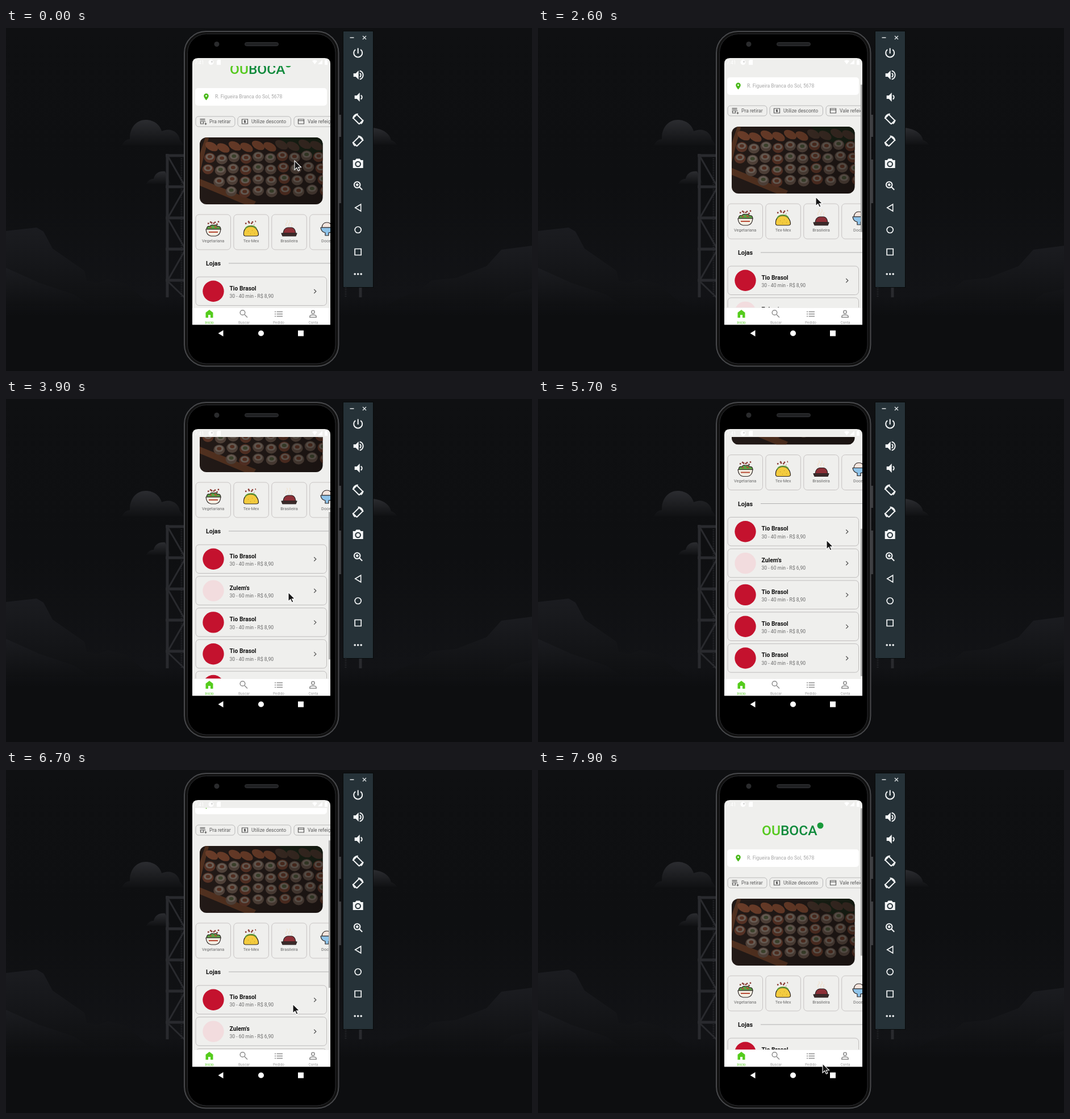
These frames come from a looping animation (926 px wide and 605 px high, 8000 ms). An HTML page:

```html
<!DOCTYPE html>
<html lang="pt">
<head>
<meta charset="utf-8">
<title>Food app scrolling</title>
<style>
  html, body { margin: 0; width: 100%; height: 100%; overflow: hidden; background: #0e0f11; }
  svg { display: block; width: 926px; height: 605px; }
  text { font: 8.6px Roboto, sans-serif; fill: #6a6a6a; }
  .bold { font-size: 10.3px; font-weight: 700; fill: #111; }
  .small { font-size: 7.4px; text-anchor: middle; }
  .tab { font-size: 6.4px; text-anchor: middle; fill: #a2a2a2; }
  .logo { font-size: 24.5px; font-weight: 500; fill: #0f8a3c; }
  .line { fill: none; stroke: currentColor; stroke-width: 2; }
  .card { fill: none; stroke: #c2bebe; stroke-width: .9; }
  .ink { stroke: #2b2424; stroke-width: 1.2; stroke-linejoin: round; }
</style>
</head>
<body>
<svg viewBox="0 0 926 605">
  <defs>
    <linearGradient id="sky" x2="0" y2="1">
      <stop stop-color="#0f1012"/><stop offset=".45" stop-color="#0e0f11"/>
      <stop offset=".78" stop-color="#121316"/><stop offset=".84" stop-color="#0d0e10"/>
    </linearGradient>
    <linearGradient id="haze" x2="0" y2="1">
      <stop stop-color="#2b2c30"/><stop offset="1" stop-color="#101113"/>
    </linearGradient>
    <linearGradient id="hill" x2="0" y2="1">
      <stop stop-color="#1b1c20"/><stop offset="1" stop-color="#0f1012"/>
    </linearGradient>
    <linearGradient id="shade">
      <stop stop-color="#000" stop-opacity=".05"/><stop offset="1" stop-color="#000" stop-opacity=".3"/>
    </linearGradient>
    <clipPath id="view"><path d="M328 67H571V493H328z"/></clipPath>
    <clipPath id="tabs"><path d="M328 493H571V523.5H328z"/></clipPath>
    <clipPath id="photo"><rect x="341" y="227" width="216.5" height="118" rx="12"/></clipPath>
  </defs>

  <!-- Backdrop -->
  <path fill="url(#sky)" d="M0 0H926V605H0z"/>
  <g fill="url(#haze)">
    <path d="M204 207q5-11 14-11c-1-20 12-34 28-34 15 0 25 9 28 20 15-7 30 1 32 15l8 10z"/>
    <path d="M247 275q4-9 13-9c2-10 10-14 20-13l10 22z"/>
    <path d="M640 176c20 0 35 8 38 22q6 1 10 8H640z"/>
  </g>
  <g fill="url(#hill)">
    <path d="M0 358L54 352 66 359 82 389 138 428 142 446 163 449 180 443 212 451 240 476 262 490H0z"/>
    <path d="M926 384L872 391 846 420 792 441 750 445 728 462 690 478 670 490H926z"/>
    <path d="M0 423L60 450 120 470 150 490H0zM926 460L890 468 860 490H926z"/>
  </g>
  <g fill="none" stroke="#292a2e" stroke-width="5">
    <path d="M284 222V475M281 225H316M281 280H316M281 335H316M281 390H316M281 445H316M624 455V475"/>
    <path stroke-width="3" d="M286 228L314 277M286 333L314 284M286 338L314 387M286 443L314 394M286 448L314 475"/>
    <path stroke-width="3" stroke-dasharray="1 2" d="M309 230V475M598 455V475"/>
  </g>

  <!-- Handset -->
  <path fill="#3b3c3f" d="M586 153h4v39h-4zM586 232h4v77h-4z"/>
  <rect x="314" y="6" width="271.5" height="590.5" rx="38" fill="#111" stroke="#48494c" stroke-width="2"/>
  <rect x="319.5" y="10.5" width="260.5" height="581.5" rx="33" fill="#000" stroke="#2c2d30"/>
  <circle cx="371" cy="28.500" r="4.500" fill="#2a2b2d"/>
  <rect x="420.500" y="25.500" width="59" height="6" rx="3" fill="#202123" stroke="#313235"/>
  <path fill="#efefed" d="M328 523V63q0-10 10-10H561q10 0 10 10V523z"/>

  <g clip-path="url(#view)">
    <g id="content">
      <text class="logo" x="394" y="115"><tspan fill="#55c91e">OU</tspan>BOCA</text>
      <circle cx="497" cy="98" r="5.500" fill="#199a3a"/>
      <rect x="333" y="140" width="232" height="31" rx="5" fill="#fff"/>
      <path fill="#4ab91b" fill-rule="evenodd" d="M352.500 149.500a4.300 4.300 0 0 1 4.300 4.300c0 3.200-4.300 7.700-4.300 7.700s-4.300-4.500-4.300-7.700a4.300 4.300 0 0 1 4.300-4.300zm0 2.700a1.500 1.500 0 1 0 .01 0z"/>
      <text x="368" y="158.300" style="fill:#a6a6a6">R. Figueira Branca do Sol, 5678</text>
      <g id="chips"></g>
      <g clip-path="url(#photo)">
        <path fill="#241b18" d="M341 227H558V345H341z"/>
        <path fill="#1b2417" d="M480 227H558V268L505 250z"/>
        <path fill="#553321" d="M341 256L351 227 357 228 347 266 341 290zM341 300L440 340 437 345H420L341 312z"/>
        <g id="rolls"></g>
        <path fill="url(#shade)" d="M341 227H558V345H341z"/>
      </g>
      <g id="foods"></g>
      <g class="ink">
        <g id="salad">
          <path fill="#5da345" d="M353 389q1-7 6-5 2-4 7-2 5-2 6 2 6-1 6 5z"/>
          <path fill="#f3eee2" d="M352 389H378q-1 11-9 12h-8q-8-1-9-12z"/>
          <path stroke="#b84a35" stroke-width="2" d="M357 394h16M359 385l3 1M367 384l4 2"/>
        </g>
        <path fill="#f3cb3e" d="M418.500 399c-1-10 5-15 12-15 9 0 14 7 14 15q-1 2-4 2h-19q-2 0-3-2z"/>
        <path fill="none" stroke="#5f9c38" stroke-width="2" d="M421 389q2-6 10-6 7 0 10 5"/>
        <path fill="none" stroke="#b98a20" d="M426 393h1M433 391h1M437 396h1M430 397h1"/>
        <path fill="#8d3037" d="M488 396q1-9 8-10h7q6 1 7 10z"/>
        <path fill="#3b2a29" d="M485 396H512l-2 5H487z"/>
        <path fill="none" stroke="#efe2cf" d="M494 384q-3-3 0-6t0-5M499 384q-3-3 0-6t0-5M504 384q-3-3 0-6"/>
        <path fill="#f3e4dc" d="M556 386q1-9 9-9t9 9z"/>
        <path fill="#8fc3e8" d="M554 386H577q-2 9-9 9v5h-6v-5q-7-1-8-9z"/>
        <path stroke="#8a3b35" stroke-width="2.600" stroke-dasharray="2.500 3.500" d="M355 379L378 375M359 376L374 381M421 379L440 375M426 375L437 381"/>
      </g>
      <text class="bold" x="352" y="453" style="font-size:10.800px">Lojas</text>
      <path stroke="#b0b0b0" d="M392 449H571"/>
      <g id="stores"></g>
    </g>
    <rect id="bar" x="568" width="3" height="260" fill="#a9a9a8"/>
  </g>

  <!-- Status bar -->
  <text x="332" y="64" style="fill:#fff">7:41</text>
  <g fill="#fff">
    <circle cx="361" cy="60.500" r="4.500"/>
    <path d="M371 58l2-2h5v9h-7zM539 58q4.500-3 9 0l-4.500 6zM549 64l8-8v8zM561 57h1v-1h3v1h1v8h-5z"/>
    <path fill="#ddd" d="M361 58h3v3h-3z"/>
  </g>

  <!-- Tabs -->
  <g clip-path="url(#tabs)">
    <path fill="#fff" d="M328 493H571V524H328z"/><path fill="#e2e2e0" d="M328 492.500H571v1H328z"/>
    <path fill="#55cc1d" d="M351.500 511V502l6.500-5 6.500 5v9h-4.500v-5h-4v5z"/>
    <g fill="none" stroke="#8c8c8c" stroke-width="1.500">
      <circle cx="416.500" cy="502" r="4.300"/><path d="M420 505.500l5 5"/>
      <path d="M473 500.500h2M473 504.500h2M473 508.500h2M476.500 500.500H487M476.500 504.500H487M476.500 508.500H487"/>
      <circle cx="540.500" cy="501" r="2.700"/><path d="M534.800 510.300v-1.300c0-4 11.400-4 11.400 0v1.300z"/>
    </g>
    <text class="tab" x="358" y="522" style="fill:#62ce31">Início</text>
    <text class="tab" x="419" y="522">Buscar</text>
    <text class="tab" x="480" y="522">Pedido</text>
    <text class="tab" x="541" y="522">Conta</text>
  </g>
  <g fill="#fff">
    <path d="M373.500 538.500l9-5.500v11zM514 533.500h10v10h-10z"/><circle cx="449" cy="538.500" r="5"/>
  </g>

  <!-- Emulator toolbar -->
  <rect x="593.500" y="5.500" width="53" height="452" fill="#263238" stroke="#080a0b"/>
  <path stroke="#dfe3e5" stroke-width="1.400" d="M605.500 17h7M628 14l6 6M634 14l-6 6"/>
  <g id="tools" color="#f4f6f7"></g>

  <path id="cursor" d="M0 0V16L3.800 12.500 6.400 18 9 17 6.500 11.500H11.500z" fill="#151515" stroke="#fff" stroke-width="1.100"/>
</svg>

<script>
const el = id => document.getElementById(id);
const fill = (id, items, draw) => el(id).innerHTML = items.map(draw).join('');

const chipIcons = [
  '<path d="M-5-4.500h9M-5-2.500h9M-5 0h10M-4 0v4h5V0M3 4h4M5 2v4"/>',
  '<path d="M-5-4h10v8h-10zM-1.500 1.500h2.500V0h-2v-1.500h2.500M0-2.500v5"/>',
  '<path d="M-5-4h10v8h-10zM-5-1.500h10"/>'
];
fill('chips', [[334, 69, 'Pra retirar'], [408, 93.5, 'Utilize desconto'], [507, 93, 'Vale refeição']],
  ([x, width, label], i) => `
    <rect class="card" x="${x}" y="190" width="${width}" height="18" rx="5" style="stroke:#b3b3b3"/>
    <g transform="translate(${x + 12.5} 199)" class="line" color="#555" style="stroke-width:1.2">${chipIcons[i]}</g>
    <text x="${x + 24}" y="202.200" style="fill:#5a5a5a">${label}</text>`);

// Rows of dim sushi: salmon at the back, round pieces in front
const rolls = [...Array(50).keys()].map(i => ({ row: Math.floor(i / 10), col: i % 10 }));
fill('rolls', rolls, ({ row, col }) => {
  const x = 362 + col * 20.500 + row * (col - 4) * .8, y = 243 + row * 20 - col * .5 + col % 2 * 3;
  if (row === 0) return `<ellipse cx="${x}" cy="${y}" rx="12" ry="7" transform="rotate(28 ${x} ${y})" fill="${col < 6 ? '#70402b' : '#423128'}"/>`;
  if (x < 350 + row * 2 || y > 312 + col * 7) return '';
  return `<ellipse cx="${x}" cy="${y}" rx="10" ry="9" fill="${col % 3 ? '#56463d' : '#5c3527'}"/>
    <ellipse cx="${x}" cy="${y - 2}" rx="7.500" ry="5.500" fill="#71665d"/>
    <ellipse cx="${x}" cy="${y - 2}" rx="4" ry="3" fill="${(col + row) % 3 ? '#5b3324' : '#424830'}"/>`;
});

fill('foods', ['Vegetariana', 'Tex-Mex', 'Brasileira', 'Doces'], (name, i) => `
  <rect class="card" x="${334 + i * 66.900}" y="363" width="61.500" height="62" rx="6"/>
  <text class="small" x="${364.700 + i * 66.900}" y="411.500">${name}</text>`);

const grill = ['Tio Brasol', '30 - 40 min - R$ 8,90', '#c4122e'];
const bistro = ["Zulem's", '30 - 60 min - R$ 6,90', '#f2dcde'];
fill('stores', [grill, bistro, grill, grill, grill], ([name, info, color], i) => `
  <g transform="translate(0 ${473 + i * 55.800})">
    <rect class="card" x="334" width="230.500" height="50.500" rx="6" style="stroke:#b9b7b7"/>
    <circle cx="365" cy="25.300" r="18.700" fill="${color}"/>
    <text class="bold" x="393.500" y="23.800">${name}</text>
    <text x="393.500" y="37.200">${info}</text>
    <path class="line" color="#555" style="stroke-width:1.300" d="M542.300 22l3.500 3.500-3.500 3.500"/>
  </g>`);

const speaker = '<path fill="currentColor" stroke="none" d="M-8-3h4l5-5V8L-4 3h-4z"/>';
const rotated = '<rect x="-4.500" y="-7.500" width="9" height="15" rx="1" transform="rotate(-45)"/><path d="M-9-1A9.500 9.500 0 0 1 0-9.500M9 1A9.500 9.500 0 0 1 5 8"/>';
fill('tools', [
  '<path d="M0-8.500V1M-4.500-6A7.500 7.500 0 1 0 4.500-6"/>',
  speaker + '<path d="M3-3.500a4 4 0 0 1 0 7M3-7.500a7.700 7.700 0 0 1 0 15"/>',
  `<g transform="translate(2)">${speaker}<path d="M3-3.500a4 4 0 0 1 0 7"/></g>`,
  rotated,
  `<g transform="scale(-1 1)">${rotated}</g>`,
  '<path fill="currentColor" stroke="none" d="M-9-6h4l2-2.500h6l2 2.500h4V8H-9z"/><circle cy="1" r="4.300" stroke="#263238"/>',
  '<circle cx="-1.500" cy="-1.500" r="5.300"/><path d="M2.500 2.500l5 5M-4-1.500h5M-1.500-4v5"/>',
  '<path d="M-5 0L5-6V6z" stroke-width="1.600"/>',
  '<circle r="5.500" stroke-width="1.700"/>',
  '<path d="M-5.500-5.500h11v11h-11z" stroke-width="1.700"/>',
  '<path stroke-width="3.600" stroke-linecap="round" d="M-5.500 0h.01M0 0h.01M5.500 0h.01"/>'
], (icon, i) => `<g class="line" transform="translate(619.700 ${44 + i * 39})">${icon}</g>`);

// time, cursor x, cursor y, scroll offset
const poses = [
  [0, 508, 234, 34], [200, 508, 234, 34], [400, 505, 226, 34], [500, 505, 226, 34],
  [700, 504, 261, 34], [1100, 503, 228, 67], [1200, 503, 228, 67], [1400, 502, 278, 17],
  [1500, 501, 320, 0], [1800, 499, 500, 0], [2200, 492, 351, 0], [2600, 489, 298, 53],
  [3300, 492, 240, 111], [3400, 492, 240, 111], [3600, 498, 446, 111], [3900, 497, 341, 216],
  [4200, 493, 292, 264.5], [4300, 491, 261, 264.5], [4500, 491, 232, 264.5], [4600, 491, 232, 264.5],
  [4800, 490, 189, 264.5], [5000, 491, 189, 264.5], [5500, 508, 249, 264.5], [5700, 508, 249, 264.5],
  [6700, 505, 413, 93], [7600, 502, 502, 9], [7900, 501, 518, 0], [8000, 501, 518, 0]
];

function render(now) {
  const time = Math.floor(now % 8000 / 100) * 100;
  const next = poses.findIndex(pose => pose[0] > time);
  const from = poses[next - 1], to = poses[next];
  const part = (time - from[0]) / (to[0] - from[0]);
  const [, x, y, scroll] = from.map((value, i) => value + (to[i] - value) * part);
  el('content').setAttribute('transform', `translate(0 ${-scroll})`);
  el('cursor').setAttribute('transform', `translate(${x} ${y})`);
  el('bar').setAttribute('y', 67.5 + scroll * .61);
  const barShown = time >= 600 && time < 5200 || time >= 5500;
  el('bar').style.opacity = barShown ? 1 : 0;
}

const start = performance.now();
function tick() {
  render(performance.now() - start);
  requestAnimationFrame(tick);
}
tick();
</script>
</body>
</html>
```
